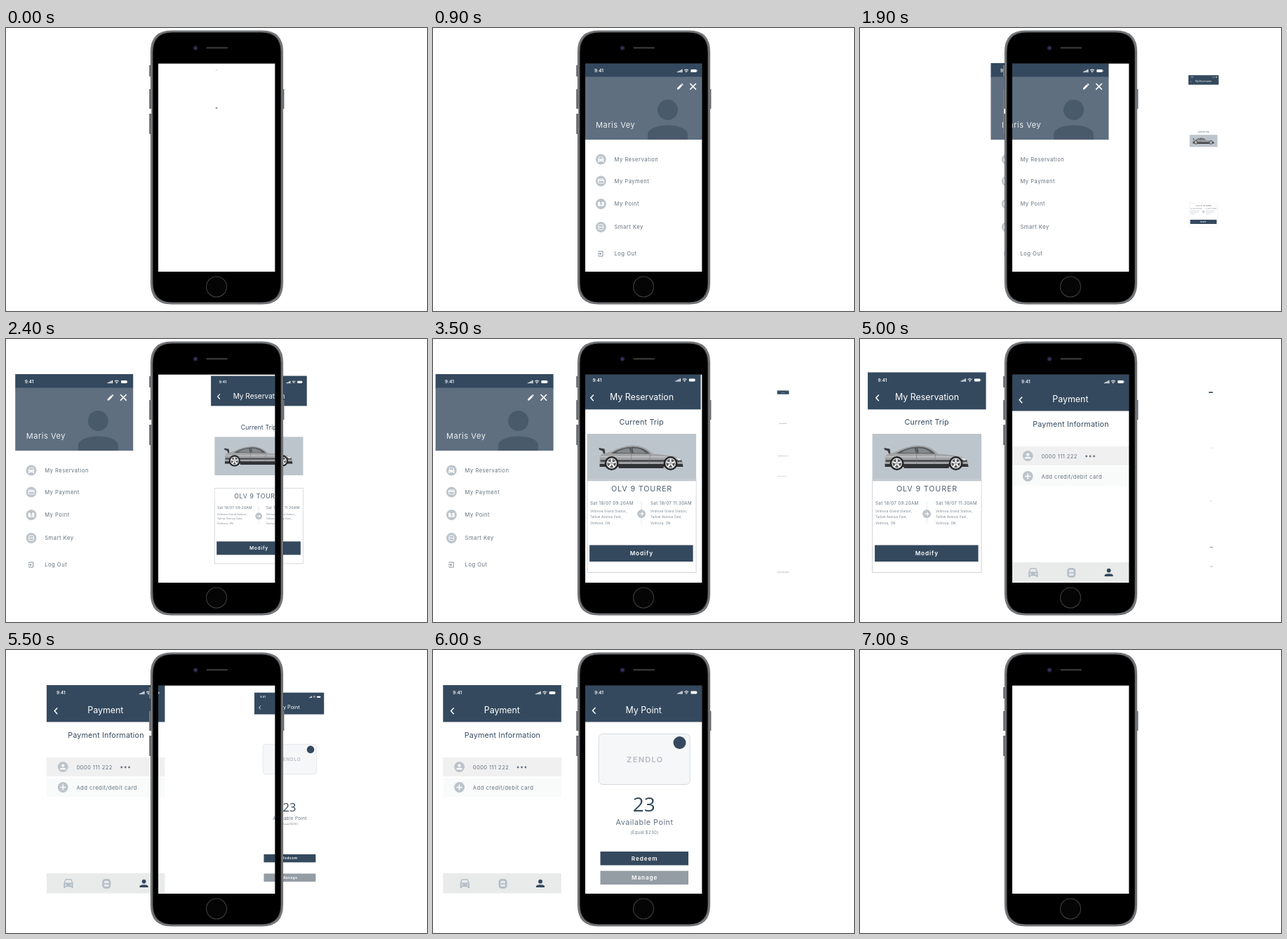
These frames come from a looping animation (600 px wide and 403 px high, 7100 ms). An HTML page:

```html
<!DOCTYPE html>
<html lang="en">
<head>
<meta charset="utf-8">
<title>Car sharing app walkthrough</title>
<style>
  html, body { margin: 0; width: 100%; height: 100%; overflow: hidden; background: #fff; }
  svg { display: block; width: 600px; height: 403px; }
  text { font-family: Inter, "Noto Sans", sans-serif; }
</style>
</head>
<body>
<svg id="stage" viewBox="0 0 600 403"></svg>
<script>
const NAVY = '#34495e', SLATE = '#5f6f80', INK = '#65727f', SILVER = '#bcc4cb', WHITE = '#fff';

// --- drawing helpers -------------------------------------------------
const rect = (x, y, w, h, fill, more = '') =>
  `<rect x="${x}" y="${y}" width="${w}" height="${h}" fill="${fill}" ${more}/>`;
const circle = (x, y, r, fill, more = '') =>
  `<circle cx="${x}" cy="${y}" r="${r}" fill="${fill}" ${more}/>`;
const shape = (d, fill, more = '') => `<path d="${d}" fill="${fill}" ${more}/>`;
const line = (d, color, width, more = '') =>
  `<path d="${d}" fill="none" stroke="${color}" stroke-width="${width}" ${more}/>`;
const at = (x, y, content, scale = 1) =>
  `<g transform="translate(${x} ${y}) scale(${scale})">${content}</g>`;

// y is the middle of the capital letters
const label = (x, y, str, size, fill, spacing = 0, more = '') =>
  `<text x="${x}" y="${y + size * 0.36}" font-size="${size}" fill="${fill}" letter-spacing="${spacing}" ${more}>${str}</text>`;
const centered = (x, y, str, size, fill, spacing = 0, more = '') =>
  label(x + spacing / 2, y, str, size, fill, spacing, `text-anchor="middle" ${more}`);

const carIcon = (x, y, color, hole, scale = 1) => at(x, y,
  shape('M-6-.5 -4.4-5Q-4-6-3-6H3Q4-6 4.4-5L6-.5V6H3.8V4.4H-3.8V6H-6Z', color) +
  shape('M-4.4-1 -3.2-4.6H3.2L4.4-1Z', hole) +
  circle(-3.5, 1.8, 1, hole) + circle(3.5, 1.8, 1, hole), scale);
const personIcon = (x, y, color, scale = 1) => at(x, y,
  circle(0, -2.8, 2.9, color) + shape('M-6 5.5V4C-6 1 6 1 6 4V5.5Z', color), scale);

function statusBar(y) {
  let bars = '';
  for (let i = 0; i < 4; i++) bars += rect(348 + i * 2, y + 0.9 - i, 1.4, 1.3 + i, WHITE);
  return label(230, y, '9:41', 6.2, WHITE, 0.1, 'font-weight="600"') + bars +
    line(`M358 ${y - 0.9}q3-2.4 6 0M359.3 ${y + 0.6}q1.7-1.4 3.4 0`, WHITE, 1) +
    circle(361, y + 1.7, 0.7, WHITE) +
    rect(367.3, y - 2, 8.4, 4, WHITE, 'rx="1"') + rect(376, y - 0.7, 0.7, 1.4, WHITE);
}
const header = (title, x, top, bottom, statusY, titleY) =>
  rect(x, top, 168.5, bottom - top, NAVY) + statusBar(statusY) +
  line(`M231.3 ${titleY - 3.6}l-4 4.4 4 4.4`, WHITE, 1.5) +
  centered(300, titleY, title, 12.4, WHITE);
const button = (x, y, w, h, fill, str) => rect(x, y, w, h, fill) +
  centered(x + w / 2, y + h / 2, str, 8.2, WHITE, 0.9, 'font-weight="600"');

function wheel(x) {
  let spokes = '';
  for (let i = 0; i < 5; i++) spokes += `<path d="M0 0V-6.4" transform="rotate(${i * 72})"/>`;
  return at(x, 177, circle(0, 0, 10, '#242628') + circle(0, 0, 7.4, '#eceded') +
    circle(0, 0, 6.2, '#55585b') + `<g stroke="#f4f4f4" stroke-width="2.3">${spokes}</g>` +
    circle(0, 0, 1.5, '#aaa'));
}
const car =
  shape('M239 155l8 1.5 1 8h-2l-2-5-5-2Z', '#3b3d40') +
  shape('M240 180V169Q241 164 247 163L257 160Q272 151.500 288 151.500Q304 151.500 316 163.500Q341 165 353 169Q359 172 359 182H240Z', '#a1a3a5') +
  shape('M256 163Q270 154 287 153.500Q302 153 312 163.500Z', '#55595d') +
  shape('M263 162Q272 156 282 155.500L284 162.500ZM287 155.300Q299 155 306 162.500H288Z', '#83888d') +
  line('M241 167.500H318Q338 167.500 355 171', '#c4c6c8', 1.4) +
  line('M241 173.500H357', '#424448', 2.4) +
  line('M285 154V182M312 164l-2 17', '#77797c', 0.6) +
  shape('M240 178H358L359 182H240ZM267 180H331V184H267Z', '#303235') +
  shape('M350 169l7 3-5 1Z', '#eee') + wheel(257) + wheel(341);

// --- screens: lists of parts, each growing about its own centre ------
const part = (x, y, content) => ({ x, y, content });

const menuItem = (y, str, icon, badge = true) => part(277, y,
  (badge ? circle(239.3, y, 7.4, SILVER) : '') + icon + label(258.5, y, str, 7.6, INK, 0.5));

const menu = [
  part(300, 60, rect(216.5, 50, 168, 20.5, NAVY) + statusBar(61)),
  part(300, 114, rect(216.5, 69.5, 168, 89.5, SLATE) +
    circle(334.5, 116.5, 14.5, '#495a6b') +
    shape('M306 159V152C306 134 363 134 363 152V159Z', '#495a6b') +
    shape('M348 87.500v-2l5.200-5.200 2 2-5.200 5.200ZM353.800 79.700l1-1 2 2-1 1Z', WHITE) +
    line('M366.300 79l8.600 8.600M374.900 79l-8.600 8.600', WHITE, 1.6) +
    label(232, 138, 'Maris Vey', 11, '#edf0f2', 0.55)),
  menuItem(187, 'My Reservation', carIcon(239.3, 187, WHITE, SILVER, 0.68)),
  menuItem(218, 'My Payment', rect(235.3, 215, 8, 6, 'none', `rx=".8" stroke="${WHITE}"`) +
    rect(235.3, 216.2, 8, 1.6, WHITE)),
  menuItem(250.500, 'My Point', rect(235, 247.5, 8.6, 6, WHITE, 'rx=".8"') +
    centered(239.3, 250.5, '$', 5.5, '#8d98a2')),
  menuItem(283.500, 'Smart Key', rect(235.9, 280, 6.8, 7, 'none', `rx="1.4" stroke="${WHITE}"`) +
    line('M236 283.500h6.600', WHITE, 1)),
  menuItem(321.500, 'Log Out', line('M236 319.500v-1.500h6v7h-6v-1.500M234.800 321.500h4.600m-1.600-1.600l1.600 1.600-1.600 1.600', '#7a8691', 0.9), false),
];

const stop = (x, time) => label(x, 234, time, 6.2, INK, 0.33) +
  ['Velmora Grand Station,', 'Tallow Avenue East,', 'Velmora, ON']
    .map((row, i) => label(x, 245.5 + i * 8.3, row, 4.4, '#7a8691', 0.2)).join('');

const reservation = [
  part(300, 74, header('My Reservation', 215.5, 47.5, 100.3, 58.5, 83)),
  part(300, 158, centered(299.5, 118, 'Current Trip', 10.7, NAVY, 0.2) +
    rect(222, 135, 155.500, 67.5, '#bdc5cc') + car),
  part(300, 266, rect(222, 200, 155.5, 132.5, 'none', 'stroke="#cfd3d7"') +
    rect(222.5, 202.5, 154.500, 20, WHITE) +
    centered(299.5, 213.5, 'OLV 9 TOURER', 10.7, '#4f5f6f', 0.9) +
    stop(226.5, 'Sat 18/07 09:20AM') + stop(312.5, 'Sat 18/07 11:30AM') +
    line('M299.500 231V264', '#dde1e4', 0.8) + circle(299.5, 249, 6, SILVER) +
    line('M296.500 249h5.600m-2.400-2.400l2.400 2.400-2.400 2.400', WHITE, 1.1) +
    button(225.5, 293.5, 147.5, 23.5, NAVY, 'Modify')),
];

const payment = [
  part(300, 76, header('Payment', 216, 50, 102.5, 61, 86)),
  part(300, 121, centered(300.5, 121, 'Payment Information', 10.7, NAVY, 0.2)),
  part(300, 166.5, rect(216, 153, 168.5, 27, '#f0f0f1') + circle(239.3, 166.5, 7.4, SILVER) +
    personIcon(239.3, 166.5, WHITE, 0.7) + label(258.5, 167, '0000 111 222', 7.6, INK, 0.4) +
    [322.8, 328.2, 333.6].map(x => circle(x, 167, 1.4, INK)).join('')),
  part(300, 195.5, rect(216, 182, 168.5, 27, '#f9fbfb') + circle(239.3, 195.5, 7.4, SILVER) +
    line('M235.300 195.500h8m-4-4v8', WHITE, 1.5) +
    label(258.5, 196.5, 'Add credit/debit card', 7.6, INK, 0.5)),
  part(300, 332, rect(216, 318, 168.5, 28.5, '#e9eaea') +
    carIcon(247, 332.5, '#b4bec7', '#e9eaea', 1.1) +
    rect(296.6, 327.4, 9.400, 11, 'none', 'rx="3" stroke="#b4bec7" stroke-width="2.6"') +
    line('M298 333h7', '#b4bec7', 1.8) + personIcon(354.7, 332.5, NAVY)),
];

const point = [
  part(300, 76, header('My Point', 216, 50, 102.5, 60.5, 85.5)),
  part(300.8, 155.5, rect(236, 119.5, 130, 72, '#f6f7f9', 'rx="6" stroke="#d4dae0"') +
    centered(301.5, 156, 'ZENDLO', 11, '#bbc1c8', 1.3, 'font-weight="700"') +
    circle(351.3, 132, 9, NAVY)),
  part(300.5, 231, centered(300.5, 220, '23', 28, NAVY, 0, 'style="font-family:\'Open Sans\',sans-serif"') +
    centered(301, 245.5, 'Available Point', 10.7, SLATE, 0.55) +
    centered(301, 259.5, '(Equal $230)', 6, '#75818c', 0.3)),
  part(300.8, 296.500, button(238.3, 287, 125.5, 19.5, NAVY, 'Redeem')),
  part(300.8, 324, button(238.3, 314.5, 125.5, 19.5, '#949ca4', 'Manage')),
];

// --- phone, in front of everything ----------------------------------
const phone =
  rect(204, 53, 3, 16, '#77797c') + rect(204, 87, 3, 28, '#77797c') +
  rect(204, 122, 3, 29, '#77797c') + rect(393.5, 87, 3, 28, '#77797c') +
  `<g fill-rule="evenodd">` +
  shape('M236 3.500H365Q395 3.500 395 34V363Q395 393.500 365 393.500H236Q206 393.500 206 363V34Q206 3.500 236 3.500ZM217 50.500V347H383.500V50.500Z', '#56585b') +
  shape('M237 6.500H364Q391.500 6.500 391.500 35V362Q391.500 390.500 364 390.500H237Q209.500 390.500 209.500 362V35Q209.500 6.500 237 6.500ZM217 50.500V347H383.500V50.500Z', '#000') +
  `</g>` +
  line('M236 4.700H365Q393.500 4.700 393.500 34V363Q393.500 392 365 392H236Q207.500 392 207.500 363V34Q207.500 4.700 236 4.700Z', '#8b8d90', 1.1) +
  rect(205, 115, 2, 7, WHITE) +
  circle(270, 28.5, 3.2, '#20203a') + circle(270, 28.5, 1.5, '#3b3b70') +
  rect(285.5, 27, 30.5, 2.6, '#343434', 'rx="1.3"') +
  circle(300, 368.5, 14.5, '#050505', 'stroke="#3c3c3e" stroke-width="1.1"');

const screens = [menu, reservation, payment, point];
const stage = document.getElementById('stage');
stage.innerHTML = screens.map(parts =>
  `<g>${parts.map(p => `<g>${p.content}</g>`).join('')}</g>`).join('') + `<g>${phone}</g>`;

// --- motion ----------------------------------------------------------
const LOOP = 7100, STEP = 100, CLEAR = 7000;
const starts = [-14, 1670, 3410, 4970];       // when each screen begins to appear
const travel = [0, 1200, 1050, 1080];         // duration of its glide to the phone
const aside = [-204.5, -203.5, -201.7, 0];    // resting offset left of the phone
const GROW = 900, SHIFT = 800, EXIT = 450;

const clamp = v => Math.min(1, Math.max(0, v));
const smoother = v => (v = clamp(v), v * v * v * (10 - 15 * v + 6 * v * v));

function render(t) {
  screens.forEach((parts, i) => {
    const scale = clamp((t - starts[i]) / GROW);
    const sinceNext = t - (starts[i + 1] ?? Infinity);
    const leaving = Math.max(0, (t - (starts[i + 2] ?? Infinity)) / EXIT);
    const group = stage.children[i];
    const visible = scale > 0 && leaving < 1 && t < CLEAR;
    group.style.display = visible ? '' : 'none';
    if (!visible) return;
    const arriving = i ? 200 * (1 - smoother((t - starts[i]) / travel[i])) : 0;
    const dx = arriving + aside[i] * smoother(sinceNext / SHIFT) - 210 * leaving * leaving;
    parts.forEach((p, k) => group.children[k].setAttribute('transform',
      `translate(${p.x + dx} ${p.y}) scale(${scale}) translate(${-p.x} ${-p.y})`));
  });
}

const origin = performance.now();
function tick() {
  const t = (performance.now() - origin) % LOOP;
  render(Math.floor(t / STEP) * STEP);
  requestAnimationFrame(tick);
}
tick();
</script>
</body>
</html>
```
